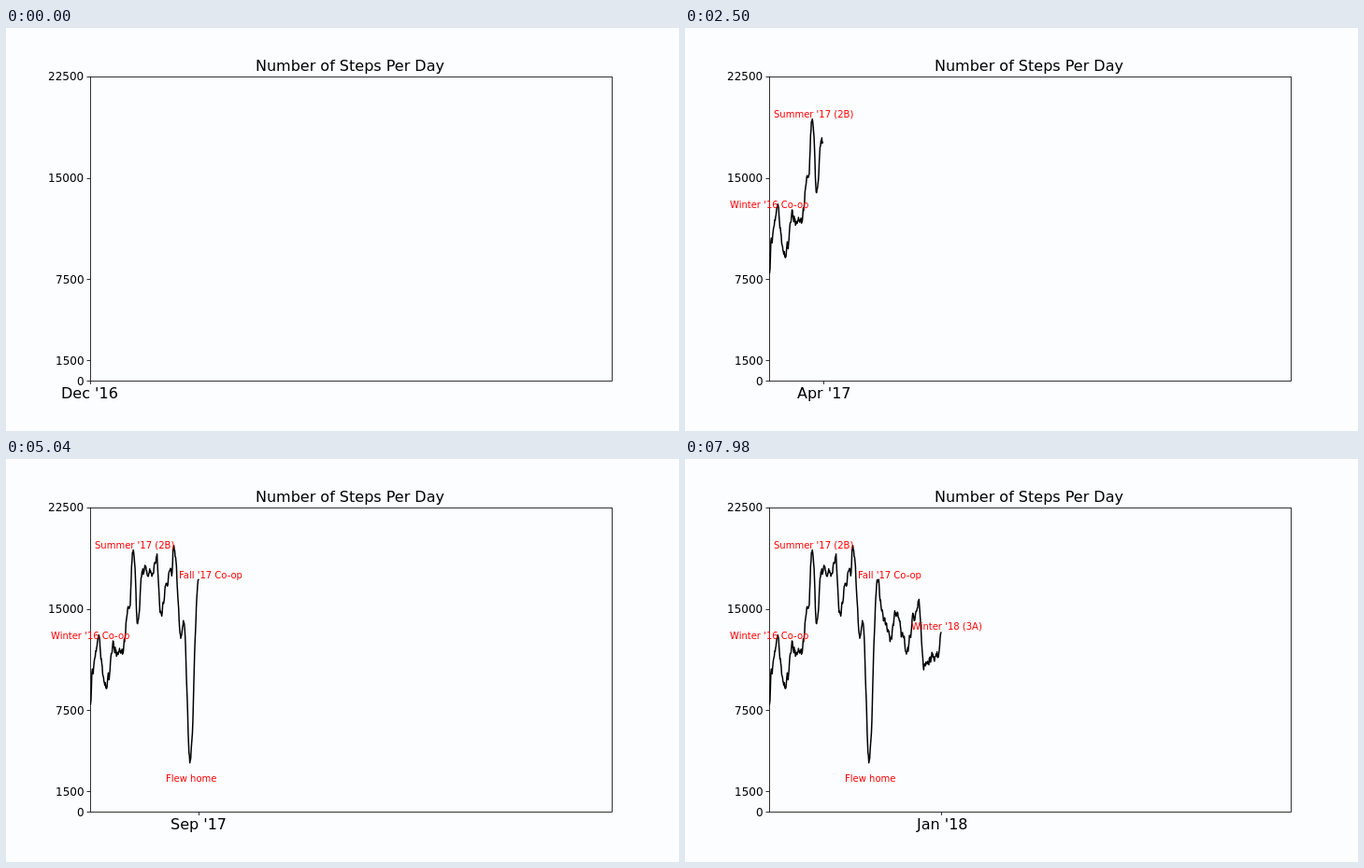
An HTML page that plays this animation: 720x432 px, repeating every 8000 ms.

```html
<!DOCTYPE html>
<html lang="en">
<head>
<meta charset="utf-8">
<title>Number of Steps Per Day</title>
<style>
  html, body { margin: 0; width: 100%; height: 100%; overflow: hidden; background: #fcfdff; }
  svg { display: block; width: 720px; height: 432px; font-family: "DejaVu Sans", Verdana, sans-serif; }
  .axis { fill: none; stroke: #000; stroke-width: .8; }
  .big { font-size: 16px; }
  .scale { font-size: 12px; }
  .note { font-size: 10px; fill: #f00; }
  #line { fill: none; stroke: #000; stroke-width: 1.5; stroke-linejoin: round; stroke-linecap: square; }
</style>
</head>
<body>
<svg viewBox="0 0 720 432">
  <clipPath id="plot"><rect x="90" y="52" width="558" height="326"/></clipPath>
  <path id="line" clip-path="url(#plot)"/>
  <rect class="axis" x="90.5" y="52.5" width="558" height="326"/>
  <g id="scale"></g>
  <path id="tick" class="axis"/>
  <text id="month" class="big" y="397"></text>
  <text class="big" x="267" y="46">Number of Steps Per Day</text>
  <g id="notes"></g>
</svg>
<script>
const DAYS = 400, DAY_MS = 20, DAY_WIDTH = 558 / 1208, LEFT = 90, BOTTOM = 378;
const START = [2016, 11, 25];
const MONTHS = 'Jan Feb Mar Apr May Jun Jul Aug Sep Oct Nov Dec'.split(' ');

// Main turning points of the curve: day, y.
const TURNS = [
  [0, 262], [6, 223], [20, 196], [34, 243], [42, 235], [52, 202], [74, 207],
  [90, 158], [100, 98], [111, 178], [120, 119], [140, 126], [154, 107],
  [165, 169], [176, 136], [188, 126], [195, 92], [210, 195], [216, 174],
  [232, 326], [250, 130], [266, 173], [281, 190], [293, 162], [318, 203],
  [346, 151], [358, 220], [378, 214], [390, 208], [399, 185]
];

const NOTES = [
  { day: 8, x: 48, y: 193, text: "Winter '16 Co-op" },
  { day: 104, x: 95, y: 96, text: "Summer '17 (2B)" },
  { day: 233, x: 171, y: 346, text: 'Flew home' },
  { day: 250, x: 185, y: 128, text: "Fall '17 Co-op" },
  { day: 376, x: 242, y: 183, text: "Winter '18 (3A)" }
];

const byId = id => document.getElementById(id);
const dayX = day => LEFT + day * DAY_WIDTH;
const pen = document.createElement('canvas').getContext('2d');

function add(parent, tag, attributes, text = '') {
  const node = document.createElementNS('http://www.w3.org/2000/svg', tag);
  for (const name in attributes) node.setAttribute(name, attributes[name]);
  node.textContent = text;
  parent.append(node);
}

// Whole-pixel text start that aligns the inked part: .5 centres it on x, 1 ends it at x.
function textStart(text, size, x, align) {
  pen.font = `${size}px "DejaVu Sans", Verdana, sans-serif`;
  const ink = pen.measureText(text);
  const left = -ink.actualBoundingBoxLeft, right = ink.actualBoundingBoxRight;
  return Math.round(x - left - (right - left) * align);
}

// Seeded value from -1 to 1 for each day.
function random(day) {
  const value = Math.sin(day * 12.9898 + 4.1) * 43758.5453;
  return 2 * (value - Math.floor(value)) - 1;
}

const wobble = day => 4 * (random(day) + random(day + 1) + random(day + 2));

function trend(day) {
  const next = Math.max(1, TURNS.findIndex(turn => turn[0] >= day));
  const [[d0, y0], [d1, y1]] = TURNS.slice(next - 1, next + 1);
  const ease = (1 - Math.cos(Math.PI * (day - d0) / (d1 - d0))) / 2;
  return y0 + (y1 - y0) * ease;
}

const points = Array.from({ length: DAYS }, (_, day) =>
  `${dayX(day).toFixed(2)} ${(trend(day) + wobble(day)).toFixed(2)}`);

function monthLabel(day) {
  const date = new Date(Date.UTC(START[0], START[1], START[2] + day));
  return `${MONTHS[date.getUTCMonth()]} '${date.getUTCFullYear() % 100}`;
}

for (const steps of [0, 1500, 7500, 15000, 22500]) {
  const y = BOTTOM - steps * 326.16 / 22500;
  const label = String(steps);
  add(byId('scale'), 'path', { class: 'axis', d: `M86.5 ${Math.round(y) + .5}H90.5` });
  add(byId('scale'), 'text', {
    class: 'scale', x: textStart(label, 12, 83, 1), y: Math.round(y + 4.6)
  }, label);
}
for (const { x, y, text } of NOTES) add(byId('notes'), 'text', { class: 'note', x, y }, text);

function draw() {
  const day = Math.floor(performance.now() / DAY_MS) % DAYS;
  const x = dayX(day);
  const label = monthLabel(day);
  byId('line').setAttribute('d', day > 1 ? 'M' + points.slice(0, day).join('L') : '');
  byId('tick').setAttribute('d', `M${Math.round(x) + .5} 378.5V382`);
  byId('month').setAttribute('x', textStart(label, 16, x, .5));
  byId('month').textContent = label;
  NOTES.forEach((note, i) => {
    byId('notes').children[i].setAttribute('visibility', day >= note.day ? 'visible' : 'hidden');
  });
  requestAnimationFrame(draw);
}
draw();
</script>
</body>
</html>
```
